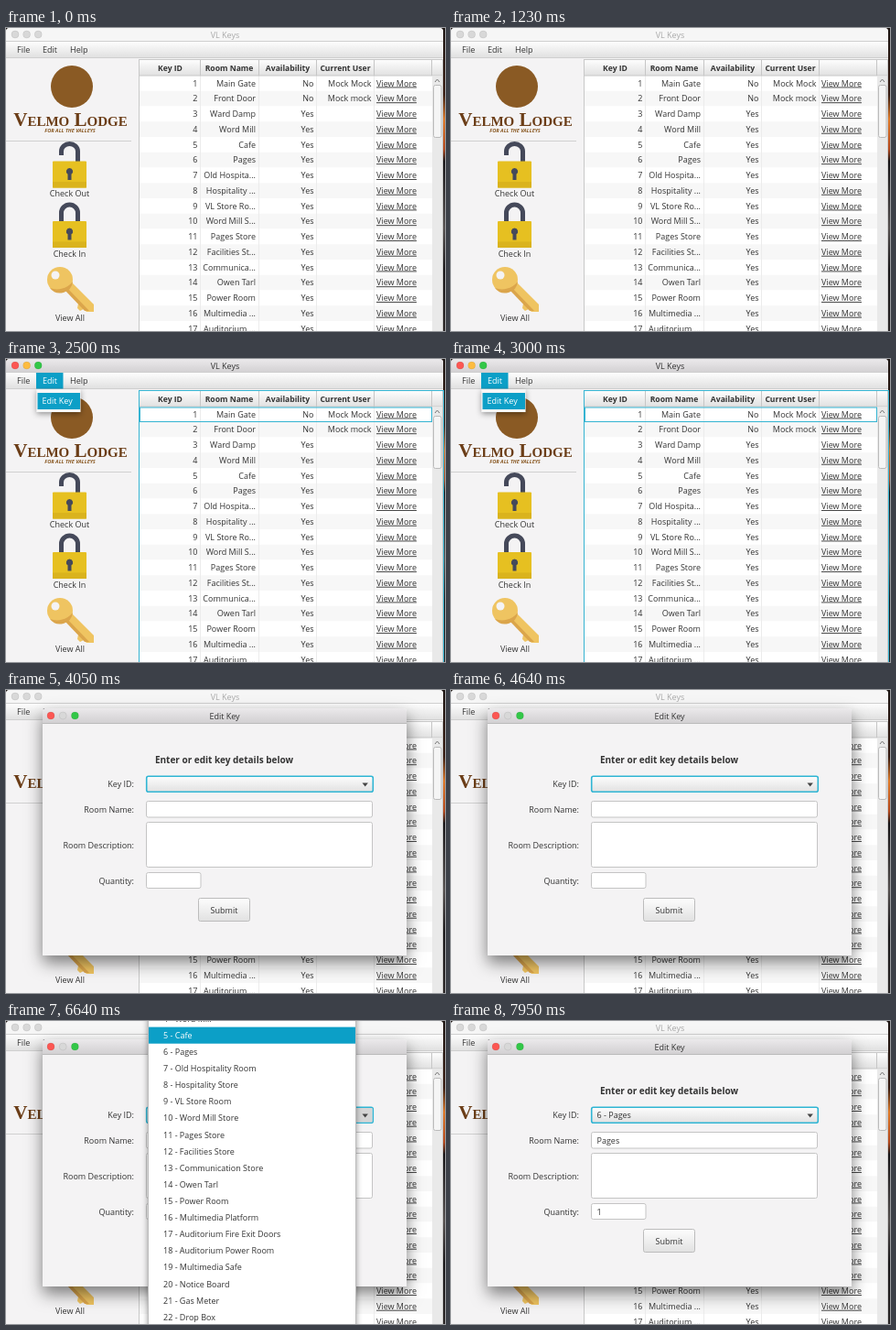
An HTML page that plays this animation: 480 by 331 pixels, repeating every 8000 ms.

```html
<!DOCTYPE html>
<html lang="en">
<head>
<meta charset="utf-8">
<title>VL Keys</title>
<style>
  html, body { margin: 0; width: 100%; height: 100%; overflow: hidden; background: #f4f3f4; }
  svg { display: block; width: 480px; height: 331px; }
  text { font: 9px "Open Sans", "Noto Sans", sans-serif; fill: #333; }
  .head { font-size: 8.6px; font-weight: 700; }
  .end { text-anchor: end; }
  .mid { text-anchor: middle; }
  .link { text-decoration: underline; }
  .light { fill: #fff; }
  .field { fill: #fff; stroke: #c4c4c4; }
  .focus { fill: none; stroke: #35b4d2; }
  .accent { fill: #0c9fc7; }
  .steel { fill: none; stroke: #45495a; stroke-width: 5; }
</style>
</head>
<body>
<svg viewBox="0 0 480 331">
  <defs>
    <linearGradient id="bar" x2="0" y2="1"><stop stop-color="#ebe9eb"/><stop offset="1" stop-color="#d2d0d2"/></linearGradient>
    <linearGradient id="soft" x2="0" y2="1"><stop stop-color="#fdfdfd"/><stop offset="1" stop-color="#e1e1e1"/></linearGradient>
    <linearGradient id="desk" x2="0" y2="1">
      <stop stop-color="#1c1512"/><stop offset=".22" stop-color="#35190f"/>
      <stop offset=".3" stop-color="#e07a28"/><stop offset=".4" stop-color="#b4481c"/>
      <stop offset=".44" stop-color="#141214"/><stop offset=".66" stop-color="#55504f"/>
      <stop offset=".8" stop-color="#181618"/><stop offset="1" stop-color="#2a2626"/>
    </linearGradient>
    <filter id="big" x="-20%" y="-20%" width="140%" height="150%"><feDropShadow dx="0" dy="8" stdDeviation="9" flood-opacity=".5"/></filter>
    <filter id="small" x="-20%" y="-30%" width="140%" height="180%"><feDropShadow dx="0" dy="2" stdDeviation="3" flood-opacity=".4"/></filter>
  </defs>

  <rect width="480" height="331" fill="url(#desk)"/>
  <path d="M0 331V4q0-4 4-4H474q4 0 4 4V331z" fill="#f4f3f4"/>
  <path id="mainBar" d="M0 15V4q0-4 4-4H474q4 0 4 4V15z"/>
  <g id="mainLights"></g>
  <text id="mainTitle" class="mid" x="239.5" y="10.5">VL Keys</text>
  <rect y="15" width="478" height="17" fill="url(#soft)"/>
  <path d="M0 14.5H478M0 32.5H478" stroke="#cfcfcf"/>
  <rect id="editTab" class="accent" x="33" y="15" width="29.5" height="17.5"/>
  <text x="12" y="27">File</text><text id="editLabel" x="40" y="27">Edit</text><text x="70" y="27">Help</text>

  <circle cx="72" cy="64" r="23" fill="#8a5a24"/>
  <text class="mid" x="70.5" y="107" style="font:bold 21px 'Liberation Serif',serif;font-variant:small-caps;fill:#6b3d17">Velmo Lodge</text>
  <text class="mid" x="70" y="114" style="font-size:5.6px;font-weight:700;font-style:italic;fill:#8a5a24">FOR ALL THE VALLEYS</text>
  <path d="M0 123.5H137" stroke="#d0d0d0"/>

  <path class="steel" d="M60.5 139V134.5a9 8 0 0 1 18 0V146"/>
  <g id="lock">
    <rect x="51" y="145.5" width="37" height="29" rx="1" fill="#e6c021"/>
    <path d="M51 168H88V174.5H51z" fill="#dab31d"/>
    <path d="M69.5 153a3.7 3.7 0 0 1 2 6.8V166h-4v-6.2a3.7 3.7 0 0 1 2-6.8z" fill="#45495a"/>
  </g>
  <path class="steel" d="M60.5 212V202a9 9 0 0 1 18 0V212"/>
  <use href="#lock" y="65.5"/>
  <g fill="#efc461">
    <path d="M64 283l6-7 26 26v8h-8l-3-3-4 2-3-3 1-5z"/>
    <circle cx="59" cy="275" r="14"/>
    <path d="M66 283l25 26h-5l-22-23z" fill="#dba54b"/>
    <path d="M48 284a14 14 0 0 0 25-7 22 22 0 0 1-25 7z" fill="#dba54b"/>
    <circle cx="54" cy="270" r="4.5" fill="#f4f3f4"/>
  </g>
  <g class="captions">
    <text class="mid" x="69.5" y="183.5">Check Out</text>
    <text class="mid" x="69.5" y="250">Check In</text>
    <text class="mid" x="70" y="319.5">View All</text>
  </g>

  <g id="table"></g>
  <g id="tableFocus" class="focus">
    <rect x="145.5" y="34.5" width="333" height="300"/>
    <rect x="146.5" y="53" width="319" height="15.5"/>
  </g>

  <g id="menu">
    <rect x="33.5" y="33" width="48" height="25" fill="#f6f6f6" filter="url(#small)"/>
    <rect id="menuHover" class="accent" x="34.5" y="37" width="46.5" height="18"/>
    <text id="menuLabel" x="39.5" y="49">Edit Key</text>
  </g>

  <g id="dialog">
    <path d="M40 290V24q0-4 4-4H434q4 0 4 4V290z" fill="#f4f3f4" filter="url(#big)"/>
    <path d="M40 36V24q0-4 4-4H434q4 0 4 4V36z" fill="url(#bar)"/>
    <path d="M40 36.5H438" stroke="#bbb"/>
    <g id="dialogLights"></g>
    <text class="mid" x="239" y="31.5">Edit Key</text>
    <text class="mid" x="238.5" y="80" style="font-size:10px;font-weight:700">Enter or edit key details below</text>
    <text class="end" x="140" y="106">Key ID:</text>
    <text class="end" x="140" y="133.5">Room Name:</text>
    <text class="end" x="140" y="172.5">Room Description:</text>
    <text class="end" x="140" y="211.5">Quantity:</text>
    <rect x="153.7" y="94.2" width="247.6" height="17" rx="2" fill="url(#soft)" stroke="#2fb5d4" stroke-width="1.6"/>
    <rect id="comboPressed" x="382" y="95" width="18.5" height="15.4" fill="#d5d5d5"/>
    <path d="M389.5 101.5h6.4l-3.2 4z" fill="#444"/>
    <rect class="field" x="153.5" y="121.5" width="247" height="17.5" rx="2"/>
    <rect class="field" x="153.5" y="144.5" width="247" height="49" rx="2"/>
    <rect class="field" x="153.5" y="199.5" width="59.5" height="17" rx="2"/>
    <rect x="210.5" y="227.5" width="56" height="25" rx="2" fill="url(#soft)" stroke="#bcbcbc"/>
    <text class="mid" x="238.5" y="243.5">Submit</text>
    <g id="values">
      <text x="159.5" y="106">6 - Pages</text>
      <text x="159.5" y="133.5">Pages</text>
      <text x="159.5" y="211.5">1</text>
    </g>
  </g>

  <g id="popup">
    <rect x="155.5" y="-6" width="227" height="345" fill="#fff" stroke="#bdbdbd" filter="url(#small)"/>
    <rect id="popupHover" class="accent" x="156" width="226" height="18.1"/>
    <g id="options"></g>
  </g>
</svg>
<script>
const $ = id => document.getElementById(id);
const show = (id, on) => $(id).setAttribute('display', on ? 'inline' : 'none');
const label = (x, y, str, cls = '') => `<text x="${x}" y="${y}" class="${cls}">${str}</text>`;
const box = (x, y, w, h, fill) => `<rect x="${x}" y="${y}" width="${w}" height="${h}" fill="${fill}"/>`;
const lights = (x, y, step, colors) => colors.map((c, i) =>
  `<circle cx="${x + i * step}" cy="${y}" r="4" fill="${c}" stroke="#000" stroke-opacity=".12" stroke-width=".6"/>`).join('');

const LOOP = 8000, ROW = 16.75, OPTION = 18.12;
const GREY = '#d8d8d8', RED = '#fc5753', YELLOW = '#fdbc40', GREEN = '#33c748';
const rooms = ['Main Gate', 'Front Door', 'Ward Damp', 'Word Mill', 'Cafe', 'Pages', 'Old Hospita...',
  'Hospitality ...', 'VL Store Ro...', 'Word Mill S...', 'Pages Store', 'Facilities St...', 'Communica...',
  'Owen Tarl', 'Power Room', 'Multimedia ...', 'Auditorium ...'];
const users = ['Mock Mock', 'Mock mock'];
const options = ['Word Mill', 'Cafe', 'Pages', 'Old Hospitality Room', 'Hospitality Store', 'VL Store Room',
  'Word Mill Store', 'Pages Store', 'Facilities Store', 'Communication Store', 'Owen Tarl', 'Power Room',
  'Multimedia Platform', 'Auditorium Fire Exit Doors', 'Auditorium Power Room', 'Multimedia Safe',
  'Notice Board', 'Gas Meter', 'Drop Box'];

function tableMarkup() {
  let out = box(145, 34, 333, 297, '#c8c8c8') + box(146, 35, 331, 296, '#fff');
  rooms.forEach((room, i) => {
    const top = 52 + i * ROW, y = top + 11.5;
    out += box(146, top, 320, ROW, i % 2 ? '#f7f7f7' : '#fff')
      + label(209.5, y, i + 1, 'end') + label(273, y, room, 'end')
      + label(336.5, y, i < 2 ? 'No' : 'Yes', 'end')
      + label(399.5, y, users[i] || '', 'end') + label(405, y, 'View More', 'link');
  });
  out += '<path d="M212.5 52V331M276.5 52V331M339.5 52V331M402.5 52V331" stroke="#ececec"/>'
    + box(146, 35, 331, 17, 'url(#soft)')
    + '<path d="M146 52H477M212.5 35V52M276.5 35V52M339.5 35V52M402.5 35V52M465.5 35V52" stroke="#c6c6c6"/>';
  [[179.5, 'Key ID'], [244, 'Room Name'], [308, 'Availability'], [371, 'Current User']]
    .forEach(([x, str]) => out += label(x, 47, str, 'head mid'));
  return out + box(466, 52.5, 11, 279, '#e9e9e9')
    + '<path d="M469 59l2.5-3 2.5 3" fill="none" stroke="#777"/>'
    + '<rect x="467.5" y="62.5" width="8.5" height="57" rx="2" fill="#f5f5f5" stroke="#bbb"/>';
}

$('table').innerHTML = tableMarkup();
$('dialogLights').innerHTML = lights(49, 28, 13.2, [RED, GREY, GREEN]);
$('options').innerHTML = options.map((name, i) =>
  label(172, 18.8 + (i - 1) * OPTION, `${i + 4} - ${name}`)).join('');

function draw(now) {
  const t = now % LOOP, during = (a, b) => t >= a && t < b;
  const active = during(1800, 3500), menu = during(2200, 3380), hover = during(2380, 3380);
  const popup = during(5100, 7050), picked = t < 6900 ? 5 : 6;

  $('mainBar').setAttribute('fill', active ? 'url(#bar)' : '#f6f6f6');
  $('mainLights').innerHTML = lights(10, 7, 12.6, active ? [RED, YELLOW, GREEN] : [GREY, GREY, GREY]);
  $('mainTitle').style.fill = active ? '#333' : '#aaa';
  show('tableFocus', active);

  show('menu', menu);
  show('editTab', menu);
  show('menuHover', hover);
  $('editLabel').classList.toggle('light', menu);
  $('menuLabel').classList.toggle('light', hover);

  show('dialog', t >= 3500);
  show('values', t >= 7050);
  show('comboPressed', popup);
  show('popup', popup);
  $('popupHover').setAttribute('y', 6.6 + (picked - 5) * OPTION);
  [...$('options').children].forEach((el, i) => el.classList.toggle('light', i + 4 === picked));
  requestAnimationFrame(() => draw(performance.now() - start));
}
const start = performance.now();
draw(0);
</script>
</body>
</html>
```
